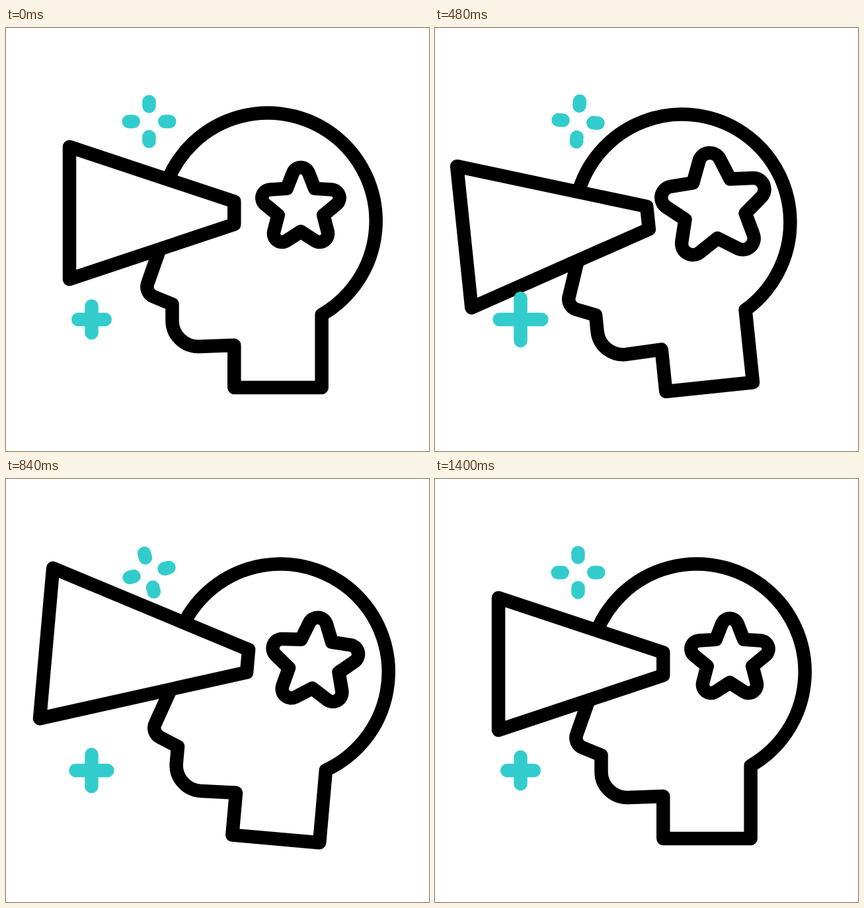
An HTML page that plays this animation: 640x640 px, repeating every 1.64 s.

```html
<!DOCTYPE html>
<html lang="en">
<head>
<meta charset="utf-8">
<title>Vision</title>
<style>
  html, body { margin: 0; width: 100%; height: 100%; overflow: hidden; background: #fff; }
  svg { display: block; width: 100vw; height: 100vh; }
</style>
</head>
<body>
<svg viewBox="0 0 640 640" fill="none" stroke-width="20.5" stroke-linejoin="round">
  <g id="head" stroke="#000">
    <path d="M237 322 L214.8 385 A16 16 0 0 0 223.5 406.5 L251.5 418 V443
             A39.5 39 0 0 0 291 482 L345.3 480 V544 H477.7 V433.8
             A163.5 163.5 0 1 0 243 235"/>
    <path id="star"/>
    <path id="cone" fill="#fff"/>
  </g>
  <g stroke="#33cccc" stroke-linecap="round">
    <path id="spark" d="M216.5 111.5 v7 M216.5 164.5 v7 M185.7 141.5 h7 M240.3 141.5 h7"/>
    <path id="plus"/>
  </g>
</svg>
<script>
const LOOP = 1640, STEP = 40;
const el = id => document.getElementById(id);
const head = el('head'), star = el('star'), cone = el('cone');
const spark = el('spark'), plus = el('plus');

const clamp = x => Math.min(1, Math.max(0, x));
const smooth = x => x * x * (3 - 2 * x);

// Eased value through [time, value] keys
function track(keys, t) {
  let [t0, v0] = keys[0];
  for (const [t1, v1] of keys) {
    if (t < t1) return v0 + (v1 - v0) * smooth(clamp((t - t0) / (t1 - t0)));
    t0 = t1;
    v0 = v1;
  }
  return v0;
}

// Quick start, long settle: cubic Bezier (.47, 0, .12, 1)
function settle(x) {
  if (x <= 0 || x >= 1) return clamp(x);
  let lo = 0, hi = 1;
  for (let i = 0; i < 24; i++) {
    const s = (lo + hi) / 2, r = 1 - s;
    const bx = 3 * r * r * s * .47 + 3 * r * s * s * .12 + s * s * s;
    if (bx < x) lo = s; else hi = s;
  }
  return smooth(lo);
}

const TILT = [[40, 0], [472, -5.95], [840, 5.05], [1360, 0]];
const BEAM = [[250, 0], [710, 60], [770, 60], [1240, 0]];
const GROW = [[40, 0], [500, 1], [555, 1], [1010, 0]];

// Five-point star with rounded tips and sharp notches
function starPath(cx, cy, k) {
  const tip = 48.3 * k, notch = 36 * k, r = 12.7 * k;
  const nx = notch * Math.sin(Math.PI / 5), ny = notch * Math.cos(Math.PI / 5);
  const lean = Math.atan2(nx, tip - ny) - Math.asin(r / Math.hypot(nx, tip - ny));
  const tx = r * Math.cos(lean), ty = tip + r * Math.sin(lean);
  let d = '';
  for (let i = 0; i < 5; i++) {
    const a = i * Math.PI * 2 / 5, c = Math.cos(a), s = Math.sin(a);
    const at = (x, y) => (cx + x * c + y * s).toFixed(2) + ' ' + (cy + x * s - y * c).toFixed(2);
    d += `${i ? 'L' : 'M'}${at(-nx, ny)} L${at(-tx, ty)} A${r} ${r} 0 0 1 ${at(tx, ty)} `;
  }
  return d + 'Z';
}

function draw(t) {
  const e = track(BEAM, t), g = track(GROW, t), arm = 20.3 + 11.7 * g;
  head.setAttribute('transform', `rotate(${track(TILT, t)} 405 508)`);
  cone.setAttribute('d',
    `M${96 - e} ${179.8 - e / 4} L345.3 262.5 V297 L${96 - e} ${380 + e / 4} Z`);
  star.setAttribute('d', starPath(446 + g, 272 + 1.3 * g, 1 + .34 * g));
  plus.setAttribute('d',
    `M${129.5 - arm} 441 h${2 * arm} M129.5 ${441 - arm} v${2 * arm}`);
  spark.setAttribute('transform', `rotate(${180 * settle((t - 40) / 1240)} 216.5 141.5)`);
}

const begin = performance.now();
function tick() {
  const t = (performance.now() - begin) % LOOP;
  draw(Math.floor(t / STEP) * STEP);
  requestAnimationFrame(tick);
}
tick();
</script>
</body>
</html>
```
